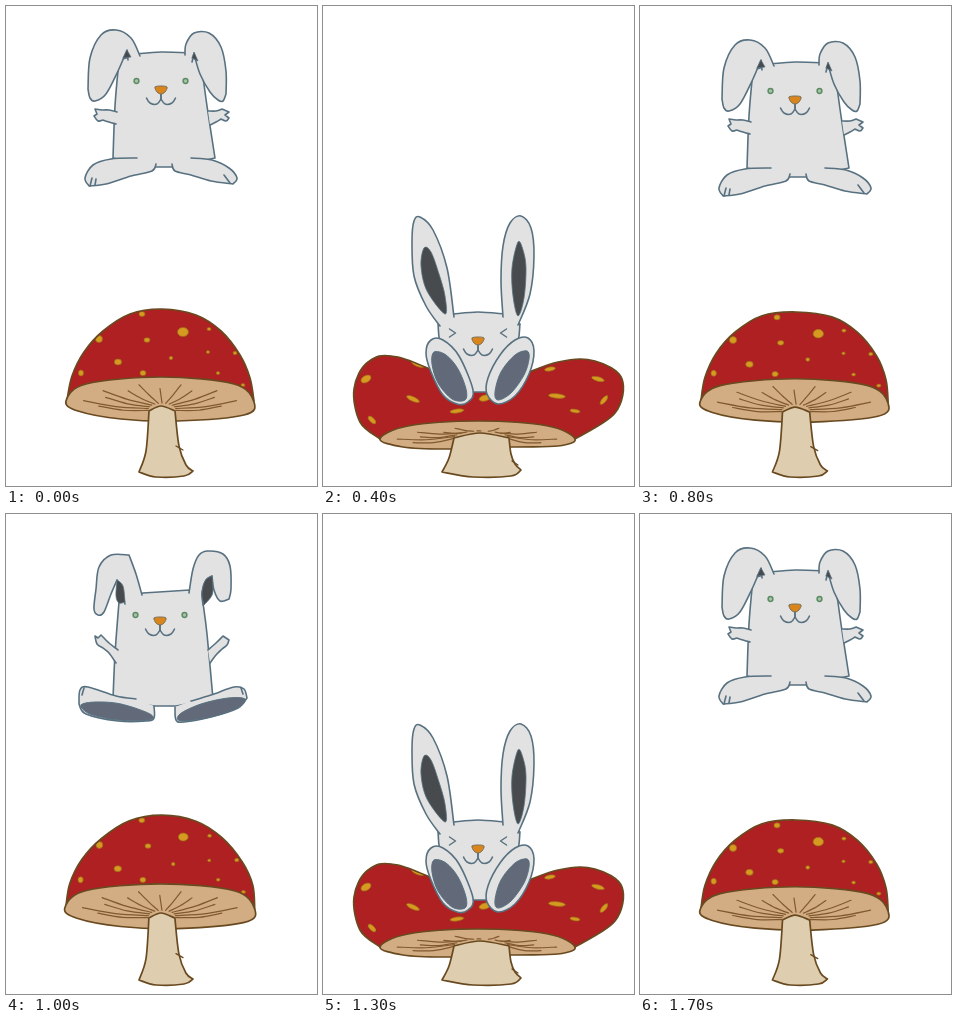
An HTML page with a canvas that plays this animation: 311 px wide and 480 px high, repeating every 1.8 s.

```html
<!DOCTYPE html>
<html lang="en">
<head>
<meta charset="utf-8">
<title>Bouncing bunny</title>
<style>
html, body { margin: 0; width: 100%; height: 100%; overflow: hidden; background: #fff; }
canvas { display: block; }
</style>
</head>
<body>
<canvas id="stage" width="311" height="480"></canvas>
<script>
const ctx = document.getElementById('stage').getContext('2d');
const STEP = 100;
const FUR = '#e2e2e2', FUR_LINE = '#587180', SOLE = '#626a79', EAR = '#484b4d';
const CAP = '#ae2021', GILL = '#d2ac83', STEM = '#dfcdaf', BROWN = '#694a20', SPOT = '#d59a1f';

// "x y x y | x y": smooth runs, with a corner at every bar
const parse = s => s.split('|').map(run => run.trim().split(/\s+/).map(Number));
const parseAll = o => Object.fromEntries(Object.entries(o).map(([k, s]) => [k, parse(s)]));
const shift = (o, dy) => Object.fromEntries(Object.entries(o).map(([k, runs]) =>
  [k, runs.map(run => run.map((v, i) => i % 2 ? v + dy : v))]));

function mix(a, b, t) {
  if (typeof a === 'number') return a + (b - a) * t;
  if (Array.isArray(a)) return a.map((v, i) => mix(v, b[i], t));
  return Object.fromEntries(Object.keys(a).map(k => [k, mix(a[k], b[k], t)]));
}

function toPath(runs) {
  const path = new Path2D();
  let last = null;
  for (const run of runs) {
    const p = last ? [last] : [];
    for (let i = 0; i < run.length; i += 2) p.push([run[i], run[i + 1]]);
    const n = p.length - 1;
    const loop = runs.length === 1 && n > 2 && p[0][0] === p[n][0] && p[0][1] === p[n][1];
    const at = i => loop ? p[(i + n) % n] : p[Math.max(0, Math.min(n, i))];
    if (!last) path.moveTo(...p[0]);
    for (let i = 0; i < n; i++) {
      const [a, b, c, d] = [at(i - 1), at(i), at(i + 1), at(i + 2)];
      path.bezierCurveTo(
        b[0] + (c[0] - a[0]) / 6, b[1] + (c[1] - a[1]) / 6,
        c[0] - (d[0] - b[0]) / 6, c[1] - (d[1] - b[1]) / 6, c[0], c[1]);
    }
    last = p[n];
  }
  return path;
}

function paint(path, fill, line, width = 1.6) {
  if (fill) { ctx.fillStyle = fill; ctx.fill(path); }
  if (line) { ctx.strokeStyle = line; ctx.lineWidth = width; ctx.stroke(path); }
}

// Bunny

const flopEars = parseAll({
  earL: '136 81 130 60 123 41 | 105 41 93 53 90 75 88 95 92 101 98 98 105 80 111 66 | 116 78 119 90',
  innerL: '111 66 117 72 119 88 | 113 89 110 82 111 66',
  earR: '183 79 187 55 193 41 202 37 217 40 224 52 225 75 223 85 | 214 87 208 76 206 62 | 200 66 196 78 197 91',
  innerR: '206 62 199 67 196 80 198 91 | 205 83 207 76 206 62'
});

const spread = {
  ...parseAll({ body: '137 79 | 184 76 | 190 82 197 89 | 201 120 207 185 | 170 192 | 148 192 | 107 185 | 109 140 113 88 | 119 86 | 137 79' }),
  ...flopEars,
  ...parseAll({
    armL: '112 136 103 129 95 121 | 92 124 | 89 122 | 91 130 97 134 | 103 139 110 149',
    armR: '202 136 210 129 217 122 | 223 126 | 221 131 216 135 | 210 141 204 149',
    footL: '130 185 110 182 82 173 74 176 73 190 | 80 200 112 207 140 207 148 204 148 192',
    soleL: '75 191 90 188 115 190 144 200 143 206 112 206 84 200 75 191',
    footR: '185 187 205 181 228 173 238 175 241 184 | 232 194 205 203 178 208 170 206 169 193',
    soleR: '239 185 222 184 195 190 174 200 175 207 205 203 231 194 239 185',
    toes: '78 174 76 181',
    toesR: '235 174 237 180',
    face: '154 101 107 117'
  })
};

const seated = {
  ...parseAll({ body: '137 152 | 183 150 | 189 154 196 161 | 199 185 205 240 | 172 265 | 148 265 | 113 240 | 112 205 118 160 | 122 157 | 137 152' }),
  ...shift(flopEars, 71.5),
  ...parseAll({
    armL: '113 205 107 212 101 219 | 98 221 | 94 222 | 95 226 102 231 | 107 227 113 234',
    armR: '203 206 207 212 211 218 | 219 223 | 218 227 213 231 | 208 226 204 236',
    footL: '137 268 118 241 95 229 80 228 75 237 | 78 250 100 275 125 286 138 286 148 265',
    soleL: '77 237 88 235 112 246 131 272 130 284 112 281 86 259 77 237',
    footR: '176 268 192 247 214 230 228 226 236 236 | 231 250 212 272 190 285 178 283 172 265',
    soleR: '234 238 224 235 200 248 183 274 185 285 202 282 225 259 234 238',
    toes: '80 229 78 235',
    toesR: '230 227 231 233',
    face: '154 187 204 214'
  })
};

const hanging = parseAll({
  body: '130 48 155 46 188 47 | 195 56 | 201 100 209 152 | 167 161 | 149 161 | 107 152 | 109 100 113 54 | 120 52 | 130 48',
  earL: '134 50 125 32 110 24 95 29 84 52 82 83 | 84 92 89 95 100 88 112 65 121 44 | 122 54',
  innerL: '117 52 | 121 44 | 125 51 | 117 52',
  earR: '179 49 180 38 188 27 203 27 215 41 220 65 220 88 | 217 95 212 94 204 86 194 68 188 48 | 186 56',
  innerR: '186 52 | 188 46 | 192 55 | 186 52',
  armL: '111 106 103 104 96 104 | 89 103 | 91 108 | 88 110 | 92 115 97 114 | 103 116 110 118',
  armR: '202 105 210 105 216 103 | 223 106 | 219 109 | 223 112 | 220 115 215 113 | 210 116 204 119',
  footL: '131 152 105 153 87 159 79 172 83 180 | 100 178 125 170 146 165 150 158',
  footR: '185 152 206 154 223 162 231 172 227 178 | 205 175 185 169 169 165 166 158',
  toes: '86 172 84 180',
  toesL: '90 173 89 179',
  toesR: '218 169 224 177',
  face: '155 75 84 94'
});

const squashed = parseAll({
  body: '131 308 155 306 181 308 | 197 318 | 192 345 164 386 | 150 386 | 120 345 115 318 | 131 308',
  earL: '117 320 103 300 91 270 89 235 91 215 97 211 110 224 124 262 131 311',
  innerL: '101 242 98 260 104 285 122 308 122 290 116 268 108 246 101 242',
  earR: '180 311 178 275 180 240 187 217 198 210 208 222 211 250 207 288 195 319',
  innerR: '195 236 189 262 190 290 195 310 201 292 203 262 200 244 195 236',
  footL: '150 384 145 396 134 398 120 389 108 366 103 347 108 334 120 334 136 350 150 384',
  soleL: '111 346 109 358 115 377 129 393 142 394 143 383 135 363 123 349 111 346',
  footR: '164 388 165 372 177 349 192 334 205 332 211 345 206 368 192 390 175 398 164 388',
  soleR: '204 345 192 349 178 366 172 386 175 394 188 387 201 369 206 353 204 345',
  face: '155 327 335 345'
});

function drawFace([x, eyeY, noseY, mouthY], shut) {
  for (const side of [-1, 1]) {
    const ex = x + side * 24.5;
    const eye = new Path2D();
    if (shut) {
      eye.moveTo(ex + side * 4, eyeY - 4);
      eye.lineTo(ex - side * 2, eyeY);
      eye.lineTo(ex + side * 4, eyeY + 4);
      paint(eye, null, FUR_LINE, 1.5);
    } else {
      eye.arc(ex, eyeY, 2.4, 0, 7);
      paint(eye, '#a9c4a2', '#5c8b67', 1.5);
    }
    const lip = [[x, noseY + 3, x, mouthY - 1],
      [x + side * 4, mouthY + 4, x + side * 11, mouthY + 3, x + side * 14.5, mouthY - 2]];
    paint(toPath(lip), null, FUR_LINE, 1.5);
  }
  const nose = [[x - 6, noseY - 3, x, noseY - 4, x + 6, noseY - 3, x + 4, noseY + 2, x, noseY + 4, x - 4, noseY + 2, x - 6, noseY - 3]];
  paint(toPath(nose), '#d9851b', '#7a705c', 1);
}

function drawBunny(shape, dy) {
  ctx.save();
  ctx.translate(0, dy);
  for (const [name, runs] of Object.entries(shape)) {
    if (name === 'face') continue;
    const path = toPath(runs);
    if (name.startsWith('inner')) paint(path, EAR, FUR_LINE, 0.8);
    else if (name.startsWith('sole')) paint(path, SOLE, FUR_LINE, 1);
    else paint(path, name.startsWith('toes') ? null : FUR, FUR_LINE);
  }
  drawFace(shape.face[0], shape === squashed);
  ctx.restore();
}

// Mushroom. gill: centre, radii, stem top, inner radius. spots: x, y, radii, degrees.

const round = parseAll({
  cap: '61 394 66 370 78 346 97 325 124 308 156 303 190 309 215 325 234 349 244 372 248 395',
  rim: '60 395 80 378 155 371 228 378 248 396 238 409 171 415 115 413 72 405 60 395',
  stem: '143 405 155 400 169 405 | 173 440 180 459 187 465 | 178 470 150 471 133 466 | 140 445 143 405',
  tick: '170 440 177 444',
  gill: '154 395 93 23 156 404 14',
  spots: '136 308 3 2.5 0 | 177 326 5.5 4.5 0 | 93 333 3.5 3.5 0 | 141 334 3 2.3 0 | 112 356 3.7 3 0 | 137 367 3 2.6 0 | 165 352 1.8 1.8 0 | 203 323 2 1.6 0 | 202 346 1.7 1.5 0 | 229 347 2 1.8 0 | 212 367 1.8 1.5 0 | 237 379 2 1.5 0 | 75 367 2.6 3 0'
});
const wide = parseAll({
  cap: '49 388 44 366 56 342 82 320 118 296 156 285 190 291 225 312 257 339 272 363 255 391',
  rim: '48 384 75 365 150 359 230 366 256 388 242 403 175 411 110 408 62 398 48 384',
  stem: '142 395 155 390 168 396 | 172 438 179 459 187 465 | 178 470 150 471 133 466 | 140 442 142 395',
  tick: '170 436 177 440',
  gill: '152 386 104 25 155 395 13',
  spots: '134 291 3 2.3 0 | 180 296 0 0 0 | 97 313 3 2.3 0 | 151 314 3 2.4 0 | 110 343 4 3 0 | 136 355 3 2.5 0 | 187 333 2 1.6 0 | 209 310 2 1.3 20 | 214 350 0 0 0 | 247 337 3.4 2.3 0 | 214 355 2 1.4 0 | 242 368 3.5 1.3 10 | 71 355 2.7 3 0'
});
const flat = parseAll({
  cap: '57 433 37 416 31 383 45 356 75 351 157 378 235 356 272 355 299 373 292 407 252 433',
  rim: '57 433 85 420 155 415 225 420 252 433 235 440 190 441 120 443 80 441 57 433',
  stem: '131 432 157 427 186 432 | 188 448 192 458 198 464 | 188 470 150 471 119 466 | 126 452 131 432',
  tick: '189 455 195 459',
  gill: '154 432 97 15 158 432 27',
  spots: '162 392 6 3 -15 | 210 368 0 0 0 | 95 358 7 2.6 20 | 134 405 7 2 -8 | 49 414 5 2.3 45 | 90 393 7 2.3 25 | 234 390 8.5 2.3 5 | 227 363 5.5 2 -10 | 240 380 0 0 0 | 275 373 6.5 2.2 15 | 252 405 5 1.8 8 | 281 394 5.5 2.2 -50 | 43 373 5.5 3.4 -30'
});

function drawShroom(shape) {
  const cap = toPath(shape.cap);
  paint(cap, CAP);
  ctx.save();
  ctx.clip(cap);
  for (const [x, y, rx, ry, deg] of shape.spots) {
    if (rx < 0.3) continue;
    const spot = new Path2D();
    spot.ellipse(x, y, rx, ry, deg * Math.PI / 180, 0, 7);
    paint(spot, SPOT, '#9a6a1c', 0.7);
  }
  ctx.restore();
  paint(cap, null, BROWN, 1.7);
  paint(toPath(shape.rim), GILL, BROWN, 1.7);

  const [gx, gy, rx, ry, sx, sy, inner] = shape.gill[0];
  for (let i = 0; i < 13; i++) {
    const a = Math.PI * (1.02 - i * 1.04 / 12);
    const reach = i % 2 ? 0.84 : 0.66;
    const c = Math.cos(a), s = Math.sin(a);
    const x1 = sx + inner * c, y1 = sy - 7 * s;
    const x2 = gx + rx * reach * c, y2 = gy + 4 - (ry + 2) * reach * s;
    paint(toPath([[x1, y1, (x1 + x2) / 2, (y1 + y2) / 2 + 2 * Math.abs(c), x2, y2]]), null, '#80592f', 1.2);
  }
  paint(toPath(shape.stem), STEM, BROWN, 1.7);
  paint(toPath(shape.tick), null, BROWN, 1.3);
}

// One bounce: bunny, vertical offset, mushroom
const poses = [
  [hanging, 0, round],
  [spread, 0, mix(round, wide, 0.1)],
  [mix(spread, seated, 0.5), 22, mix(round, wide, 0.1)],
  [squashed, -56, mix(wide, flat, 0.5)],
  [squashed, 0, flat],
  [squashed, -62, mix(wide, flat, 0.45)],
  [seated, 0, wide],
  [mix(seated, spread, 0.65), 0, mix(round, wide, 0.4)],
  [hanging, 10, mix(round, flat, 0.04)]
];

ctx.lineCap = ctx.lineJoin = 'round';
const start = performance.now();
let shown = -1;

function tick() {
  const i = Math.floor((performance.now() - start) / STEP) % poses.length;
  if (i !== shown) {
    shown = i;
    const [bunny, dy, shroom] = poses[i];
    ctx.fillStyle = '#fff';
    ctx.fillRect(0, 0, 311, 480);
    drawShroom(shroom);
    drawBunny(bunny, dy);
  }
  requestAnimationFrame(tick);
}
tick();
</script>
</body>
</html>
```
